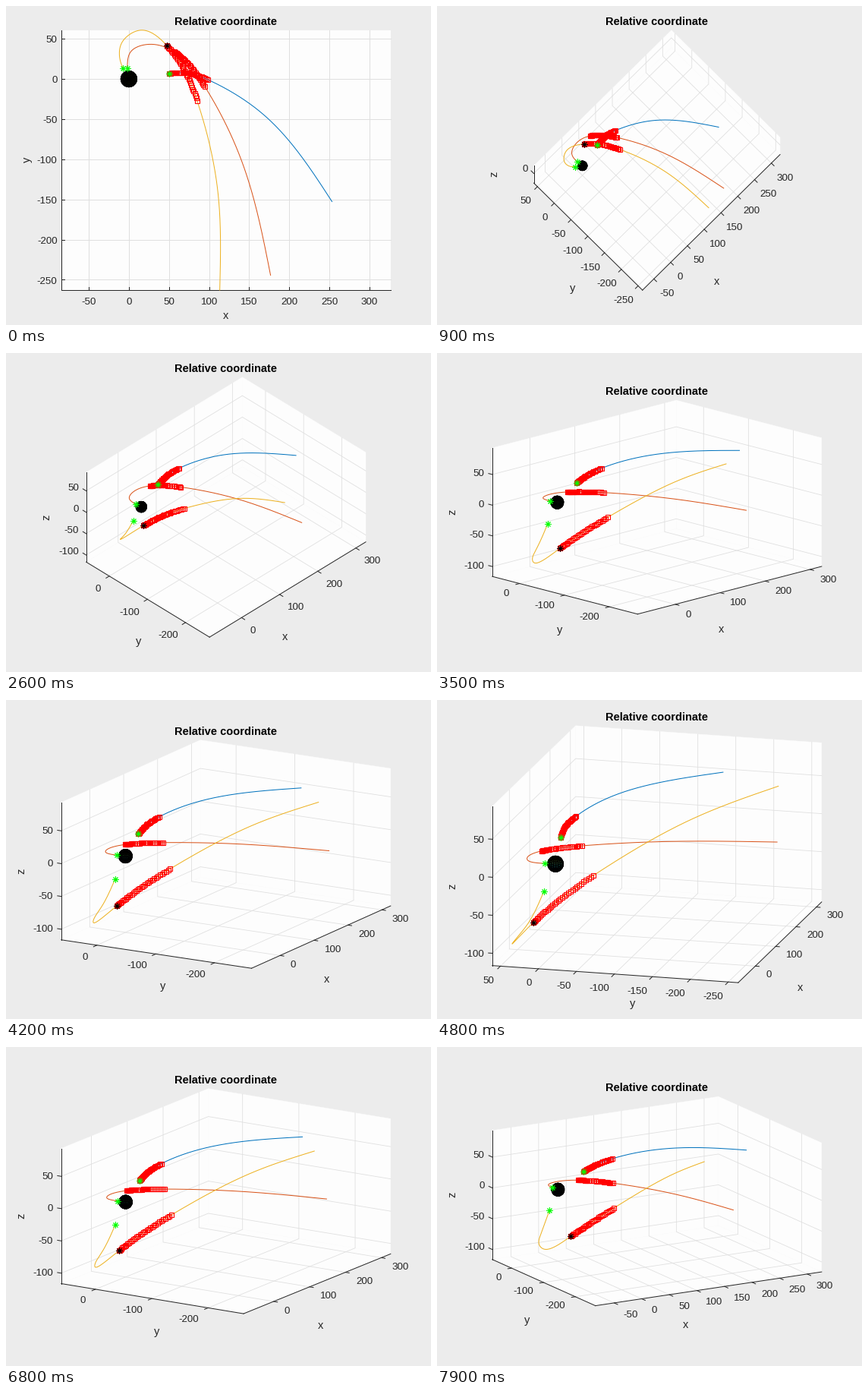
Write a matplotlib script that moves like this. It is 560 by 420 pixels and loops after 8000 ms.

```python
import numpy as np
import matplotlib.pyplot as plt
from matplotlib.animation import FuncAnimation
from matplotlib.collections import LineCollection, PolyCollection

W, H, DPI = 560, 420, 100
PX = 72 / DPI  # points per pixel
plt.rcParams["font.family"] = "Liberation Sans"

BACK, WALL, INK, GRID = "#ececec", "#fdfdfd", "#262626", "#dfdfdf"
LO = np.array([-84.0, -263.0, -116.2])
HI = np.array([326.0, 60.8, 93.3])
MID = (LO + HI) / 2
LEFT, RIGHT, TOP, BOTTOM = 72.8, 506.8, 31.8, 374.1


def spline(knots):
    """Natural cubic spline by chord length: returns knot times and curve."""
    p = np.array(knots, float)
    n = len(p)
    h = np.linalg.norm(np.diff(p, axis=0), axis=1)
    t = np.r_[0, np.cumsum(h)]
    a, b = np.eye(n), np.zeros_like(p)
    for i in range(1, n - 1):
        a[i, i - 1:i + 2] = h[i - 1], 2 * (h[i - 1] + h[i]), h[i]
        b[i] = 6 * ((p[i + 1] - p[i]) / h[i] - (p[i] - p[i - 1]) / h[i - 1])
    m = np.linalg.solve(a, b)

    def curve(u):
        i = np.clip(np.searchsorted(t, u) - 1, 0, n - 2)
        r, l, k = (t[i + 1] - u)[:, None], (u - t[i])[:, None], h[i][:, None]
        return ((m[i] * r**3 + m[i + 1] * l**3) / (6 * k)
                + (p[i] / k - m[i] * k / 6) * r
                + (p[i + 1] / k - m[i + 1] * k / 6) * l)
    return t, curve


def track(color, first, last, *knots):
    """Curve through the knots, with speeding-up marks between two of them."""
    t, curve = spline(knots)
    q = np.linspace(0, 1, 34) ** 1.35
    return dict(color=color, path=curve(np.linspace(0, t[-1], 240)),
                marks=curve(t[first] + (t[last] - t[first]) * q))


TRACKS = [
    track("#0072bd", 0, 2, (50, 6.9, 21.2), (75, 7.2, 29.5), (98.2, -.7, 37.3),
          (168.1, -44.6, 54.2), (253.2, -152.7, 65.7)),
    track("#d95319", 3, 4, (-1.9, 13.5, 0), (1.9, 33.3, 0), (22.7, 43, 0),
          (56.7, 33.8, 0), (94.5, -9.2, 0), (144.5, -113, 0), (176.6, -244.4, 0)),
    track("#edb120", 4, 5, (-7.5, 13.5, -35.6), (-11.8, 33.3, -78),
          (-6.6, 48.5, -98), (14.2, 60.7, -113), (47.2, 41.8, -92),
          (85, -27, -35.4), (111.5, -146, 38.5), (113.3, -263, 91.2))]


def sphere(n=20, r=10):
    lat = np.linspace(-np.pi / 2, np.pi / 2, n + 1)
    lon = np.linspace(0, 2 * np.pi, n + 1)

    def at(i, j):
        return (r * np.cos(lat[i]) * np.cos(lon[j]),
                r * np.cos(lat[i]) * np.sin(lon[j]), r * np.sin(lat[i]))
    return np.array([[at(i, j), at(i, j + 1), at(i + 1, j + 1), at(i + 1, j)]
                     for i in range(n) for j in range(n)])


FACES = sphere()
HEIGHT = (FACES[:, :, 2].mean(axis=1) + 10) / 20
TINT = np.stack([np.interp(HEIGHT, (0, .5, 1), c) for c in
                 ((.24, .13, .98), (.15, .70, .98), (.66, .68, .08))], axis=1)


class View:
    """Orthographic camera that fits the data box into the plot area."""

    def __init__(self, az, el):
        self.az, self.el = az, el
        a, e = np.radians([az, el])
        sa, ca, se, ce = np.sin(a), np.cos(a), np.sin(e), np.cos(e)
        self.right = np.array([ca, sa, 0])
        self.up = np.array([-se * sa, se * ca, ce])
        self.eye = np.array([ce * sa, -ce * ca, se])
        w, h = abs(self.right) @ (HI - LO), abs(self.up) @ (HI - LO)
        self.s = min((RIGHT - LEFT) / w, (BOTTOM - TOP) / h)
        self.top = (TOP + BOTTOM - self.s * h) / 2

    def vector(self, d):
        d = np.asarray(d, float)
        return self.s * np.stack([d @ self.right, -(d @ self.up)], axis=-1)

    def __call__(self, p):
        return self.vector(np.asarray(p, float) - MID) + [(LEFT + RIGHT) / 2,
                                                          (TOP + BOTTOM) / 2]


def view_at(k):
    if k < 5:
        return View(0, 90)
    if k < 36:
        return View(-45, 90 - 2.5 * (k - 5))
    return View(-90 + 2.5 * abs(k - 54 - (k > 54)), 15)


fig = plt.figure(figsize=(W / DPI, H / DPI), dpi=DPI, facecolor=BACK)
ax = fig.add_axes([0, 0, 1, 1])


def text(x, y, s, size=13.33, **kw):
    kw = {"color": INK, "ha": "center", "va": "center_baseline", **kw}
    ax.text(x, y, s, fontsize=size * PX, **kw)


def lines(segs, color, z, width=1.0):
    ax.add_collection(LineCollection(segs, colors=color, linewidths=width * PX,
                                     zorder=z, capstyle="projecting"))


def ticks(i, step):
    return [int(t) for t in np.arange(np.ceil(LO[i] / step) * step, HI[i], step)]


def half_width(s):
    return sum(4.4 if c == "-" else 7.4 for c in s) / 2


def flat_axes(v):
    grid, marks = [], []
    for x in ticks(0, 50):
        px = v((x, 0, 0))[0]
        grid.append([(px, TOP), (px, BOTTOM)])
        marks.append([(px, BOTTOM), (px, BOTTOM - 4)])
        text(px, 388.5, str(x))
    for y in ticks(1, 50):
        py = v((0, y, 0))[1]
        grid.append([(LEFT, py), (RIGHT, py)])
        marks.append([(LEFT, py), (LEFT + 4, py)])
        text(67.5, py + .7, str(y), ha="right")
    ax.fill([LEFT, RIGHT, RIGHT, LEFT], [TOP, TOP, BOTTOM, BOTTOM], color=WALL, lw=0)
    lines(grid, GRID, 1)
    lines(marks + [[(LEFT, TOP), (LEFT, BOTTOM), (RIGHT, BOTTOM)]], INK, 1.5)
    text(290, 407, "x", 14.67)
    text(28, 202, "y", 14.67, rotation=90, va="center")


def tick_step(i, v):
    dx, dy = abs(v.vector(50 * np.eye(3)[i]))
    if i == 0:
        return 50 if dx > 33 or dy > 17 else 100
    if i == 1:
        return 50 if dx > 44 or dy > 20 else 100
    return 50 if dy > 13 else 100 if dy > 6.5 else 200


def rail(i, t):
    """Grid line of one tick: from its axis to the corner and on along the wall."""
    (x0, y0, z0), (x1, y1, z1) = LO, HI
    return [[(t, y0, z0), (t, y1, z0), (t, y1, z1)],
            [(x0, t, z0), (x1, t, z0), (x1, t, z1)],
            [(x0, y1, t), (x1, y1, t), (x1, y0, t)]][i]


OUT = [(0, -1, 0), (-1, 0, 0), (0, 1, 0)]


def label_shift(i, v):
    """Where the axis name stands from the middle of its edge."""
    lift = min((v.el - 15) / 45, 1.2)
    if i == 0:
        return -1.25 * (v.az + 54) + 15 * lift, 46 - .28 * (v.az + 30) + 22 * lift
    if i == 1:
        return -(v.az + 52) - 11 * lift, 35 + .25 * (v.az + 85) + 18 * lift
    return -52, 0


def solid_axes(v):
    (x0, y0, z0), (x1, y1, z1) = LO, HI
    for wall in ([(x0, y0, z0), (x1, y0, z0), (x1, y1, z0), (x0, y1, z0)],
                 [(x1, y0, z0), (x1, y1, z0), (x1, y1, z1), (x1, y0, z1)],
                 [(x0, y1, z0), (x1, y1, z0), (x1, y1, z1), (x0, y1, z1)]):
        ax.fill(*v(wall).T, facecolor=WALL, edgecolor=WALL, lw=.3)
    grid, marks = [], []
    for i in range(3 if v.el < 90 else 2):
        d = v.vector(OUT[i])
        d /= np.hypot(*d)
        for t in ticks(i, tick_step(i, v)):
            seg = v(rail(i, t))
            p, s = seg[0], str(t)
            grid.append(seg)
            marks.append([p, p + 5 * d])
            if i < 2:
                text(p[0] + d[0] * (14 + half_width(s)), p[1] + 13 * d[1] + 9, s)
            else:
                text(p[0] + 11 * d[0], p[1] + 11 * d[1] + .7, s, ha="right")
        edge = v([rail(i, LO[i])[0], rail(i, HI[i])[0]])
        marks.append(edge)
        x, y = edge.mean(axis=0) + label_shift(i, v)
        turn = dict(rotation=90, va="center") if i == 2 else {}
        text(x, y, "xyz"[i], 14.67, **turn)
    lines(grid, GRID, 1, .8)
    lines(marks, INK, 1.5)


def star(p, color, z):
    ax.plot(*p, marker=(8, 2, 0), ms=8 * PX, mew=PX, color=color, zorder=z)


def draw(k):
    ax.clear()
    ax.set(xlim=(0, W), ylim=(H, 0))
    ax.axis("off")
    v = view_at(k)
    (flat_axes if k < 5 else solid_axes)(v)
    text(289.5, v.top - 12.5, "Relative coordinate", 14.67, color="k", weight="bold")

    for tr in TRACKS:
        ax.plot(*v(tr["path"]).T, color=tr["color"], lw=PX, zorder=2)
        ax.plot(*v(tr["marks"]).T, "s", ms=6 * PX, mew=1.1 * PX, mec="r",
                mfc="none", zorder=3)
        star(v(tr["path"][0]), "#00ff00", 5)
    star(v(TRACKS[2]["marks"][0]), "k", 4)

    front = FACES.mean(axis=1) @ v.eye > 0
    ax.add_collection(PolyCollection(v(FACES[front]), facecolors=TINT[front],
                                     edgecolors="k", linewidths=1.2 * PX, zorder=4))
    return []


anim = FuncAnimation(fig, draw, frames=80, interval=100, init_func=lambda: [],
                     repeat=True, repeat_delay=0, blit=False)
plt.show()
```
